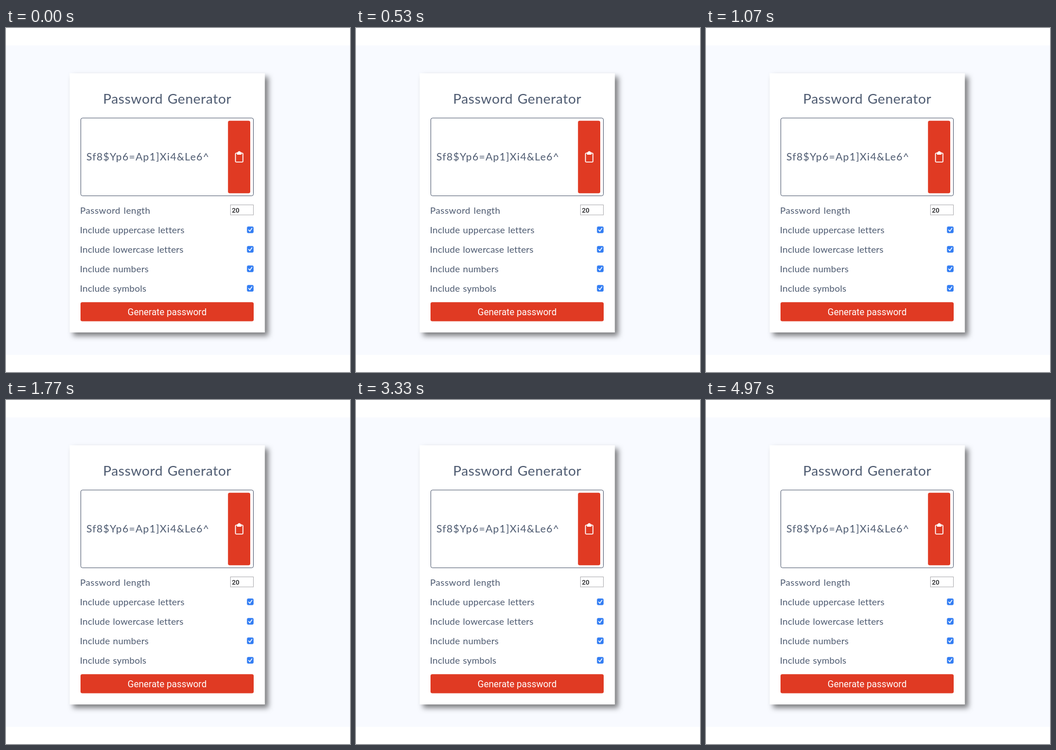
These frames come from a looping animation (600x600 px, 5030 ms). An HTML page:

```html
<!DOCTYPE html>
<html lang="en">
<head>
<meta charset="utf-8">
<title>Password Generator</title>
<style>
  html, body { margin: 0; width: 100%; height: 100%; overflow: hidden; background: #fff; }
  svg { display: block; width: 100vw; height: 100vh; }
  text { font-family: Lato, sans-serif; fill: #4d5a70; }
  .card { fill: #fff; filter: drop-shadow(6px 6px 5px rgba(0, 0, 0, .5)); }
  .title { font-size: 24px; letter-spacing: .45px; word-spacing: 1.6px; text-anchor: middle; }
  .password { font-size: 18px; letter-spacing: 1.05px; }
  .label { font-size: 16px; letter-spacing: .18px; word-spacing: 1px; }
  .label.wide { letter-spacing: .42px; }
  .red { fill: #e03a23; }
  .result { fill: #fff; stroke: #5a6579; }
  .field { fill: #fff; stroke: #b4b4b8; }
  .number { font: 500 11.5px Roboto, sans-serif; fill: #1d1d20; }
  .button { font: 16px Roboto, sans-serif; fill: #fff; text-anchor: middle; }
  .icon { fill: none; stroke: #fff; stroke-width: 1.6; stroke-linejoin: round; }
</style>
</head>
<body>
<!-- The picture holds one still pose for the whole loop. -->
<svg viewBox="0 0 600 600">
  <defs>
    <g id="check">
      <rect width="11.5" height="11.5" rx="2.2" fill="#327df3"/>
      <path d="M3 6.1 5 8.4 8.6 3.2" fill="none" stroke="#fff" stroke-width="1.5" stroke-linecap="round" stroke-linejoin="round"/>
    </g>
  </defs>

  <rect y="30.5" width="600" height="539.5" fill="#f8faff"/>
  <rect class="card" x="111" y="79" width="340.5" height="452"/>
  <text class="title" x="281.2" y="131.5">Password Generator</text>

  <rect class="result" x="130.5" y="157" width="301" height="135.7" rx="3"/>
  <text class="password" x="140.3" y="231">Sf8$Yp6=Ap1]Xi4&amp;Le6^</text>
  <rect class="red" x="387.2" y="161.7" width="38.8" height="126.6" rx="3"/>
  <g class="icon">
    <rect x="400.3" y="218.2" width="13" height="15.6" rx="1.3"/>
    <path d="M403.6 217.4h6.4v2.8h-6.4z" fill="#fff"/>
    <circle cx="406.8" cy="217" r="1.5"/>
  </g>

  <text class="label wide" x="129.2" y="323.5">Password length</text>
  <rect class="field" x="391.5" y="308.5" width="40" height="17.5"/>
  <text class="number" x="394" y="321.7">20</text>

  <text class="label" x="129" y="357.7">Include uppercase letters</text>
  <use href="#check" x="420.3" y="346.2"/>
  <text class="label" x="129" y="391.8">Include lowercase letters</text>
  <use href="#check" x="420.3" y="380.2"/>
  <text class="label" x="129" y="425.9">Include numbers</text>
  <use href="#check" x="420.3" y="414.2"/>
  <text class="label" x="129" y="460">Include symbols</text>
  <use href="#check" x="420.3" y="448.2"/>

  <rect class="red" x="130" y="478.3" width="302" height="33.2" rx="3"/>
  <text class="button" x="281" y="500.7">Generate password</text>
</svg>
</body>
</html>
```
